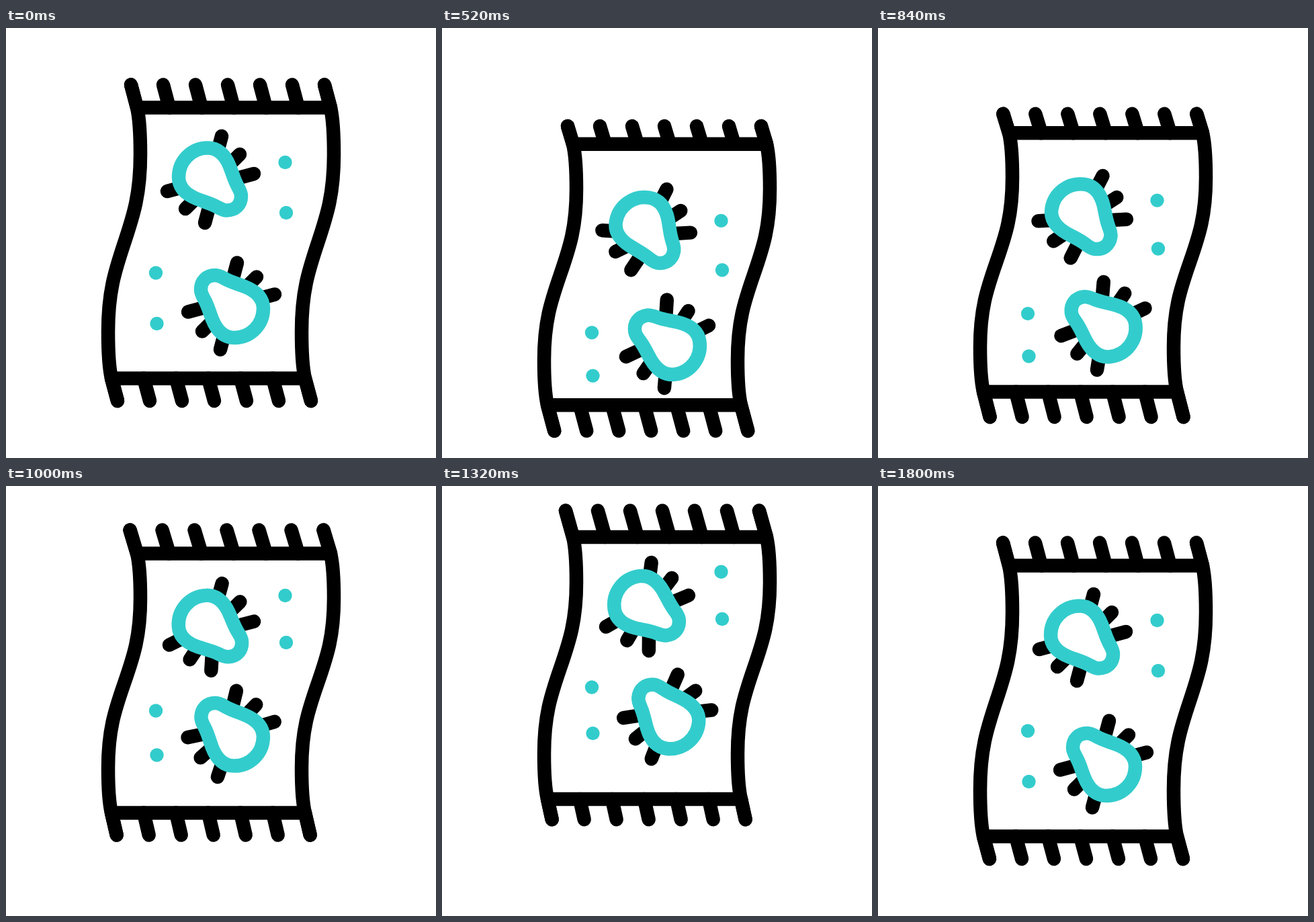
Write an HTML page with a canvas that moves like this. It is 640 px wide and 640 px high and loops after 2 s.

```html
<!DOCTYPE html>
<html lang="en">
<head>
<meta charset="utf-8">
<title>Beach towel</title>
<style>
html, body { margin: 0; width: 100%; height: 100%; overflow: hidden; background: #fff; }
canvas { display: block; width: 100vw; height: 100vh; }
</style>
</head>
<body>
<canvas id="stage" width="640" height="640"></canvas>
<script>
const ctx = document.getElementById('stage').getContext('2d');
const LOOP = 2000, STEP = 40;
const TEAL = '#33cccc';
const RAD = Math.PI / 180;

// Poses alternate between turning points (even) and in-between points (odd).
const TIMES = [80, 360, 680, 1000, 1170, 1480, 1760];

const towel = {
  topTip: [84.5, 118.5, 159.5, 65.5, 26, 59.5],
  topBar: [118.5, 148, 185, 100.5, 67, 95.5],
  lowBar: [521.5, 543.5, 570, 486.5, 453.5, 492.5],
  lowTip: [555, 579.5, 609.5, 519.5, 483, 524.5],
  topX: [186, 186.5, 187.2, 184.5, 183.5, 185],
  lowX: [166, 166.7, 167.5, 164.7, 163, 165]
};

const dots = [
  { x: 415.5, y: [200, 248, 306, 163, 112.5, 161] },
  { x: 417, y: [275, 322, 379, 233, 182, 233] },
  { x: 223, y: [364.5, 413.5, 473, 334.5, 286, 329] },
  { x: 224.5, y: [440, 482.5, 535, 400.5, 353, 401] }
];

// spin: shell; front / back: the two leg fans
const crabs = [
  {
    x: 306, turn: 0,
    y: [228, 268.5, 319.5, 212, 173, 203],
    spin: [0, 5, 14, -3, -10, -4],
    front: [0, 3.4, 17, 0.5, -10.3, -3.3],
    back: [0, 6, 18.5, -8.5, -14, -4.7]
  },
  {
    x: 334, turn: 180,
    y: [411.5, 442.5, 479.5, 367, 326.5, 373.2],
    spin: [0, -5, -10, 1, 7, 2.5],
    front: [0, -7, -11, 3.5, 8, 3],
    back: [0, -5, -10, -1, 8, 3]
  }
];

// Leg tips around the shell centre: x, y, direction in degrees
const frontLegs = [[15, -67, -75], [42, -40, -45], [63, -11, -15]];
const backLegs = [[-66, 15, 165], [-39, 41, 135], [-10, 62, 105]];

const shell = new Path2D(
  'M-49 -6 C-49 -30 -30 -49.5 -6 -49.5 C11 -49.5 21 -37 27 -22 ' +
  'C32 -9 33.5 -2 39 8 C41.5 12.5 44 17 44 22 C44 35 35.5 43.5 22.5 43.5 ' +
  'C17.5 43.5 13 41 8.5 38.5 C-1.5 33 -8.5 31.5 -21.5 26.5 C-36.5 20.5 -49 10.5 -49 -6 Z'
);

// Smooth curve through the poses, at rest on every turning point.
function at(values, t) {
  const v = [...values, values[0]];
  const last = TIMES.length - 1;
  if (t <= TIMES[0] || t >= TIMES[last]) return v[0];
  const slope = i => i % 2
    ? 1.4 * (v[i + 1] - v[i - 1]) / (TIMES[i + 1] - TIMES[i - 1])
    : 0;
  let i = 0;
  while (t >= TIMES[i + 1]) i++;
  const d = TIMES[i + 1] - TIMES[i];
  const u = (t - TIMES[i]) / d;
  const s = u * u * (3 - 2 * u);
  return v[i] + (v[i + 1] - v[i]) * s
    + d * u * (1 - u) * ((1 - u) * slope(i) - u * slope(i + 1));
}

function line(x1, y1, x2, y2) {
  ctx.beginPath();
  ctx.moveTo(x1, y1);
  ctx.lineTo(x2, y2);
  ctx.stroke();
}

function drawTowel(t) {
  const p = {};
  for (const key in towel) p[key] = at(towel[key], t);
  const y = rest => p.topBar + (rest - 118.5) / 403 * (p.lowBar - p.topBar);

  for (let k = 0; k < 7; k++) {
    const x = 48 * k;
    line(p.topX + x, p.topTip, 195 + x, p.topBar);
    line(157 + x, p.lowBar, p.lowX + x, p.lowTip);
  }
  for (const x of [0, 288]) {
    ctx.beginPath();
    ctx.moveTo(p.topX + x, p.topTip);
    ctx.lineTo(195 + x, p.topBar);
    ctx.bezierCurveTo(198.5 + x, y(134), 200 + x, y(160), 200 + x, y(188));
    ctx.bezierCurveTo(200 + x, y(247), 190 + x, y(278), 176 + x, y(320));
    ctx.bezierCurveTo(162 + x, y(362), 152 + x, y(393), 152 + x, y(452));
    ctx.bezierCurveTo(152 + x, y(480), 153.5 + x, y(506), 157 + x, p.lowBar);
    ctx.lineTo(p.lowX + x, p.lowTip);
    ctx.stroke();
  }
  line(195, p.topBar, 483, p.topBar);
  line(157, p.lowBar, 445, p.lowBar);
}

function drawLegs(legs, angle, bend) {
  ctx.save();
  ctx.rotate(angle * RAD);
  for (const [x, y, dir] of legs) {
    const a = (dir + angle * bend) * RAD;
    line(x, y, x - 28 * Math.cos(a), y - 28 * Math.sin(a));
  }
  ctx.restore();
}

function drawCrab(crab, t) {
  ctx.save();
  ctx.translate(crab.x, at(crab.y, t));
  ctx.rotate(crab.turn * RAD);
  drawLegs(frontLegs, at(crab.front, t), 0);
  drawLegs(backLegs, at(crab.back, t), 0.35);
  ctx.rotate(at(crab.spin, t) * RAD);
  ctx.fillStyle = '#fff';
  ctx.fill(shell);
  ctx.strokeStyle = TEAL;
  ctx.stroke(shell);
  ctx.restore();
}

function draw(t) {
  ctx.fillStyle = '#fff';
  ctx.fillRect(0, 0, 640, 640);
  ctx.lineWidth = 20.5;
  ctx.lineCap = 'round';
  ctx.lineJoin = 'miter';
  ctx.strokeStyle = '#000';
  drawTowel(t);
  for (const crab of crabs) drawCrab(crab, t);
  ctx.fillStyle = TEAL;
  for (const dot of dots) {
    ctx.beginPath();
    ctx.arc(dot.x, at(dot.y, t), 10.2, 0, 2 * Math.PI);
    ctx.fill();
  }
}

const start = performance.now();
function tick() {
  const t = (performance.now() - start) % LOOP;
  draw(Math.floor(t / STEP) * STEP);
  requestAnimationFrame(tick);
}
tick();
</script>
</body>
</html>
```
